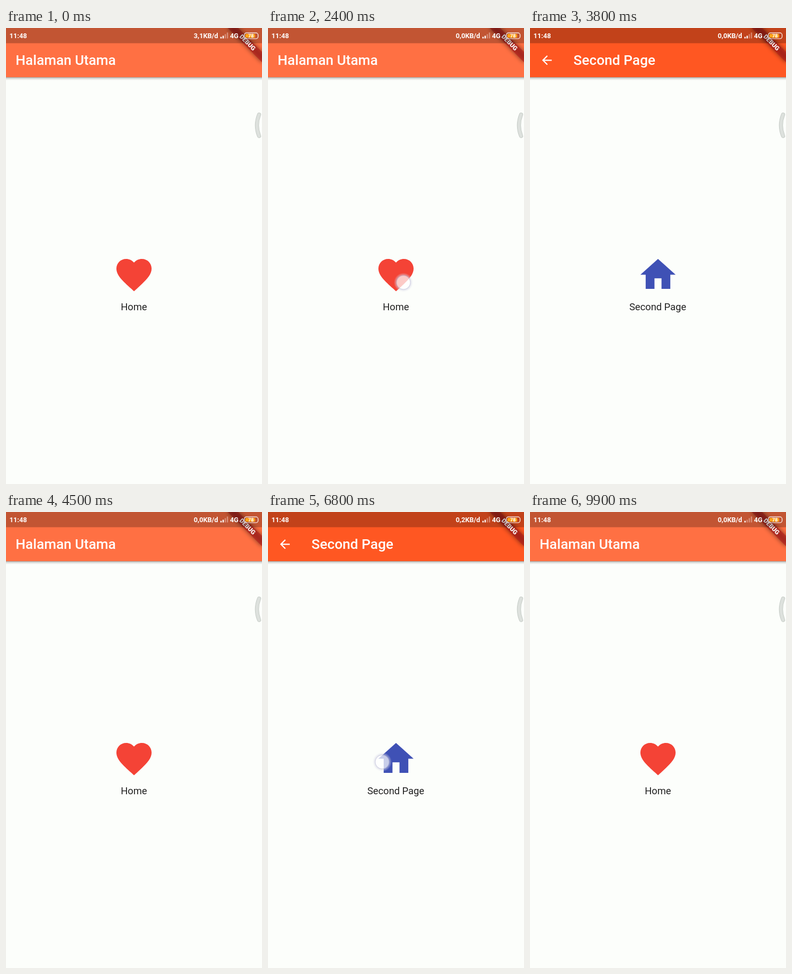
An HTML page that plays this animation: 480 px wide and 853 px high, repeating every 10000 ms.

```html
<!DOCTYPE html>
<html lang="id">
<head>
<meta charset="utf-8">
<title>Page navigation</title>
<style>
  html, body { margin: 0; width: 100%; height: 100%; overflow: hidden; background: #fcfefb; }
  svg { display: block; width: 100vw; height: 100vh; font-family: Roboto, sans-serif; }
  .title { font-size: 26.07px; font-weight: 500; fill: #fff; }
  .label { font-size: 18.25px; fill: #212121; text-anchor: middle; }
  .status { font-size: 12.7px; font-weight: 700; fill: #fff; }
</style>
</head>
<body>
<svg viewBox="0 0 480 853" xmlns="http://www.w3.org/2000/svg">
  <defs>
    <linearGradient id="shade" x1="0" y1="0" x2="0" y2="1">
      <stop offset="0" stop-color="#000" stop-opacity=".36"/>
      <stop offset=".4" stop-color="#000" stop-opacity=".13"/>
      <stop offset="1" stop-color="#000" stop-opacity="0"/>
    </linearGradient>
    <radialGradient id="touch">
      <stop offset="0" stop-color="#fff" stop-opacity=".72"/>
      <stop offset=".66" stop-color="#fff" stop-opacity=".72"/>
      <stop offset=".71" stop-color="#c6c6de" stop-opacity=".85"/>
      <stop offset=".77" stop-color="#d0d0e2" stop-opacity=".5"/>
      <stop offset="1" stop-color="#e4e4ee" stop-opacity="0"/>
    </radialGradient>
    <filter id="blur" x="-30%" y="-120%" width="160%" height="340%">
      <feGaussianBlur stdDeviation="4.3"/>
    </filter>
  </defs>

  <g id="home">
    <rect width="480" height="853" fill="#fcfefb"/>
    <rect y="92" width="480" height="6" fill="url(#shade)"/>
    <rect width="480" height="92" fill="#ff7043"/>
    <text class="title" x="18.1" y="69">Halaman Utama</text>
    <path transform="translate(200.4 422) scale(3.3)" fill="#f44336"
      d="M12 21.35l-1.45-1.32C5.4 15.36 2 12.28 2 8.5 2 5.42 4.42 3 7.5 3c1.74 0 3.41.81 4.5 2.09C13.09 3.81 14.76 3 16.5 3 19.58 3 22 5.42 22 8.5c0 3.78-3.4 6.86-8.55 11.54z"/>
    <text class="label" x="239.8" y="528">Home</text>
  </g>

  <g id="second">
    <rect width="480" height="853" fill="#fcfefb"/>
    <rect y="92" width="480" height="6" fill="url(#shade)"/>
    <rect width="480" height="92" fill="#ff5722"/>
    <path transform="translate(18.1 46.7) scale(1.133)" fill="#fff"
      d="M20 11H7.83l5.59-5.59L12 4l-8 8 8 8 1.41-1.41L7.83 13H20z"/>
    <text class="title" x="81.6" y="69">Second Page</text>
    <path transform="translate(200.4 422) scale(3.3)" fill="#3f51b5"
      d="M10 20v-6h4v6h5v-8h3L12 3 2 12h3v8z"/>
    <text class="label" x="239.5" y="528">Second Page</text>
  </g>

  <g transform="translate(480 0) rotate(45)">
    <rect x="-45.3" y="31.7" width="90.6" height="13.6" fill="#000" opacity=".5" filter="url(#blur)"/>
    <rect x="-45.3" y="31.7" width="90.6" height="13.6" fill="#b71c1c" fill-opacity=".63"/>
    <text y="42.3" text-anchor="middle" font-size="11.56" font-weight="900" fill="#fff">DEBUG</text>
  </g>

  <rect width="480" height="28.5" fill="#000" opacity=".24"/>
  <g class="status">
    <text x="6.5" y="19">11:48</text>
    <text id="speed" x="352" y="19"></text>
    <g id="bars"></g>
    <text x="420" y="19">4G</text>
    <rect x="446.7" y="9.2" width="26" height="10.8" rx="4" fill="none" stroke="#fff" stroke-width="1.2"/>
    <rect x="448.6" y="11" width="18.5" height="7.2" rx="2" fill="#ffa31a"/>
    <text x="459.3" y="18" font-size="9.2" text-anchor="middle">78</text>
  </g>

  <g fill="none" stroke-linecap="round">
    <path d="M474.5 162Q466.5 182 474.5 202" stroke="#c3c9c4" stroke-width="7.4"/>
    <path d="M474.5 162Q466.5 182 474.5 202" stroke="#dde1dd" stroke-width="5.6"/>
  </g>

  <circle id="dot" r="18" fill="url(#touch)"/>
</svg>

<script>
const LOOP = 10000, TICK = 100, FADE = 300, RISE = 853 / 4;
const $ = id => document.getElementById(id);
const second = $('second'), dot = $('dot'), speed = $('speed');

// x, y, press time, time on screen
const taps = [
  { x: 254, y: 476, at: 2400, span: 300 },
  { x: 32, y: 60.5, at: 4000, span: 300 },
  { x: 254, y: 476, at: 5400, span: 300 },
  { x: 214, y: 467.5, at: 6800, span: 500 },
  { x: 32, y: 60.5, at: 7800, span: 300 },
  { x: 393, y: 801, at: 8900, span: 300 }
];
// second page opens and closes
const visits = [
  { open: 2485, close: 4175 },
  { open: 5485, close: 7950 }
];

const bars = [3, 5, 8, 11].map((h, i) => {
  const bar = document.createElementNS('http://www.w3.org/2000/svg', 'rect');
  const attrs = { x: 402 + i * 4, y: 19.5 - h, width: 2.4, height: h, fill: '#fff' };
  for (const key in attrs) bar.setAttribute(key, attrs[key]);
  $('bars').append(bar);
  return bar;
});

const clamp = v => Math.min(1, Math.max(0, v));

function bezier(x1, y1, x2, y2) {
  const at = (a, b, s) => 3 * a * s * (1 - s) ** 2 + 3 * b * s * s * (1 - s) + s ** 3;
  return x => {
    if (x <= 0 || x >= 1) return clamp(x);
    let lo = 0, hi = 1;
    for (let i = 0; i < 24; i++) {
      const mid = (lo + hi) / 2;
      if (at(x1, x2, mid) < x) lo = mid; else hi = mid;
    }
    return at(y1, y2, lo);
  };
}
const slide = bezier(.4, 0, .2, 1);
const easeIn = bezier(.42, 0, 1, 1);

function drawPages(t) {
  const v = Math.max(...visits.map(({ open, close }) =>
    Math.min(clamp((t - open) / FADE), 1 - clamp((t - close) / FADE))));
  second.setAttribute('opacity', easeIn(v));
  second.setAttribute('transform', `translate(0 ${RISE * (1 - slide(v))})`);
  second.style.display = v > 0 ? '' : 'none';
}

function drawDot(t) {
  const tap = taps.find(p => t >= p.at && t < p.at + p.span);
  dot.style.display = tap ? '' : 'none';
  if (!tap) return;
  dot.setAttribute('cx', tap.x);
  dot.setAttribute('cy', tap.y);
  dot.setAttribute('opacity', clamp((tap.at + tap.span - t) / 180));
}

function drawStatus(t) {
  const rate = t < 1600 ? '3,1' : t >= 5600 && t < 9600 ? '0,2' : '0,0';
  speed.textContent = rate + 'KB/d';
  const lit = t < 9900 ? 2 : 1;
  bars.forEach((bar, i) => bar.setAttribute('opacity', i < lit ? 1 : .35));
}

function render(ms) {
  const t = Math.floor((ms % LOOP) / TICK) * TICK;
  drawPages(t);
  drawDot(t);
  drawStatus(t);
}

const start = performance.now();
function frame() {
  render(performance.now() - start);
  requestAnimationFrame(frame);
}
frame();
</script>
</body>
</html>
```
